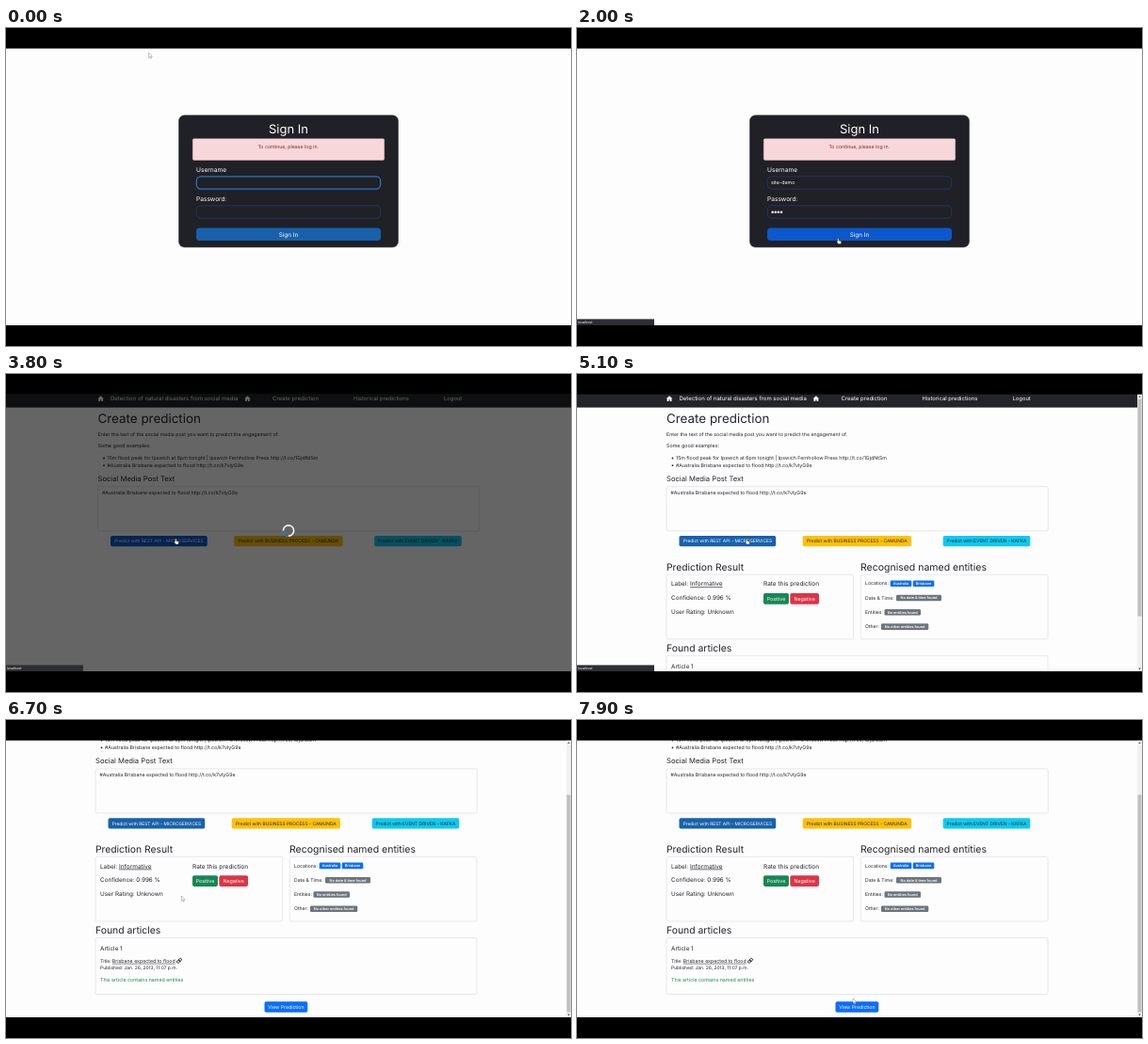
Animation of 600 by 338 pixels, one loop 8 s. Source, as an HTML page:

```html
<!DOCTYPE html>
<html lang="en">
<head>
<meta charset="utf-8">
<title>Create prediction</title>
<style>
  html, body { margin: 0; width: 100%; height: 100%; overflow: hidden; background: #000; }
  svg { display: block; width: 600px; height: 338px; }
  text { font-family: Inter, "Open Sans", sans-serif; text-rendering: geometricPrecision; white-space: pre; }
</style>
</head>
<body>
<script>
const NS = 'http://www.w3.org/2000/svg';
const LOOP = 8000, STEP = 100;
const INK = '#212529', BLUE = '#1761ac', HOVER = '#0b57cc', PRIMARY = '#0d6efd', GREY = '#6c757d';
const SCROLL = 67.8, TOP = 21.5, BOTTOM = 316;

function add(parent, tag, attrs = {}, text) {
  const el = document.createElementNS(NS, tag);
  for (const k in attrs) el.setAttribute(k, attrs[k]);
  if (text) el.textContent = text;
  parent.appendChild(el);
  return el;
}
const group = (p, attrs) => add(p, 'g', attrs);
const path = (p, d, attrs) => add(p, 'path', { d, ...attrs });
const box = (p, x1, y1, x2, y2, fill, rx = 0, more = {}) =>
  add(p, 'rect', { x: x1, y: y1, width: x2 - x1, height: y2 - y1, rx, fill, ...more });
const label = (p, x, y, size, str, fill = INK, more = {}) =>
  add(p, 'text', { x, y, 'font-size': size, fill, ...more }, str);
const middle = (p, x, y, size, str, fill, more) =>
  label(p, x, y, size, str, fill, { 'text-anchor': 'middle', ...more });

function button(p, x1, y1, x2, y2, fill, str, size, color = '#fff') {
  const b = box(p, x1, y1, x2, y2, fill, 1.8);
  middle(p, (x1 + x2) / 2, (y1 + y2) / 2 + size * 0.36, size, str, color);
  return b;
}
function badge(p, x1, x2, y, fill, str) {
  box(p, x1, y - 3.3, x2, y + 3.3, fill, 1.3);
  middle(p, (x1 + x2) / 2, y + 1.4, 3.85, str, '#fff', { 'font-weight': 600 });
}
const show = (el, on) => el.setAttribute('visibility', on ? 'inherit' : 'hidden');

const svg = add(document.body, 'svg', { viewBox: '0 0 600 338' });
box(svg, 0, TOP, 600, BOTTOM, '#fefdfe');

// Sign-in form
const login = group(svg);
box(login, 183.5, 92.8, 416.5, 233, '#202027', 6, { stroke: '#3a3a44', 'stroke-width': 0.6 });
middle(login, 300, 111.7, 13, 'Sign In', '#fff');
box(login, 198.3, 117.7, 401.7, 140.4, '#f8d7da', 1.3, { stroke: '#f5c2c7', 'stroke-width': 0.4 });
middle(login, 299.7, 128, 5.22, 'To continue, please log in.', '#842029');
label(login, 202, 152.7, 6.6, 'Username', '#fff');
label(login, 202, 183.6, 6.6, 'Password:', '#fff');
const fields = [157.8, 188.8].map(y => box(login, 202.3, y, 397.7, y + 13.4, '#202027', 4.6));
const user = label(login, 206, 166.3, 5.3, '', '#fff');
const dots = [0, 1, 2, 3].map(i => add(login, 'circle', { cx: 207.7 + i * 3.1, cy: 195.7, r: 1.25, fill: '#fff' }));
const signIn = box(login, 202, 212.5, 398, 226, BLUE, 3.5);
middle(login, 300, 221.5, 6.35, 'Sign In', '#fff');

// Prediction page
const page = group(svg);
box(page, -10, 21, 620, 35.6, INK);
const HOME = 'M3.3 0 6.6 3H5.7V5.8H3.9V3.9H2.7V5.8H.9V3H0Z';
for (const x of [94.8, 250.6]) path(page, HOME, { fill: '#fff', transform: `translate(${x} 23.3)` });
label(page, 108.5, 28.4, 6, 'Detection of natural disasters from social media', '#fff');
label(page, 280.5, 28.4, 6, 'Create prediction', '#fff');
label(page, 366.5, 28.4, 5.9, 'Historical predictions', '#fff');
label(page, 462.5, 28.4, 5.85, 'Logout', '#fff');

const POST = '#Australia Brisbane expected to flood http://t.co/k7vIyG9e';
label(page, 95, 52.4, 13.4, 'Create prediction');
label(page, 95, 66.1, 5.24, 'Enter the text of the social media post you want to predict the engagement of.');
label(page, 95, 78.4, 5.35, 'Some good examples:');
const samples = ['15m flood peak for Ipswich at 6pm tonight | Ipswich Fernhollow Press http://t.co/1GjdNtSm', POST];
samples.forEach((s, i) => {
  add(page, 'circle', { cx: 101.5, cy: 89.5 + i * 7.7, r: 0.9, fill: INK });
  label(page, 105, 91.2 + i * 7.7, 5.25, s);
});
label(page, 95, 114.3, 7.65, 'Social Media Post Text');
const area = box(page, 95, 119.7, 500.3, 166.8, '#fefdfe', 1.8);
const post = label(page, 99.4, 127.6, 5.24, POST);
const rest = button(page, 108.5, 172, 211.2, 183.3, BLUE, 'Predict with REST API - MICROSERVICES', 4.87);
button(page, 239.7, 172, 355, 183.3, '#ffc107', 'Predict with BUSINESS PROCESS - CAMUNDA', 4.87, INK);
button(page, 388.7, 172, 481.3, 183.3, '#0dcaf0', 'Predict with EVENT DRIVEN - KAFKA', 4.87, INK);

// Results
const result = group(page);
const card = (x1, y1, x2, y2) =>
  box(result, x1, y1, x2, y2, '#fefdfe', 1.5, { stroke: '#d9dadd', 'stroke-width': 0.6 });
label(result, 95, 208.7, 10.3, 'Prediction Result');
label(result, 301, 208.7, 10.5, 'Recognised named entities');
card(95, 213.2, 293.6, 281.8);
card(301.4, 213.2, 500, 281.8);
label(result, 100, 225.4, 6.4, 'Label:');
label(result, 120, 225.4, 6.5, 'Informative', INK, { 'text-decoration': 'underline' });
label(result, 100, 240.2, 6.35, 'Confidence: 0.996 %');
label(result, 100, 254.5, 6.35, 'User Rating: Unknown');
label(result, 198, 225.4, 6.5, 'Rate this prediction');
button(result, 198, 233, 225, 244.7, '#198754', 'Positive', 5.25);
button(result, 226.3, 233, 257, 244.7, '#dc3545', 'Negative', 5.35);
const rows = [
  ['Locations:', [332.7, 355.3, PRIMARY, 'Australia'], [356.8, 379.3, PRIMARY, 'Brisbane']],
  ['Date & Time:', [339, 387, GREY, 'No date & time found']],
  ['Entities:', [326.5, 365, GREY, 'No entities found']],
  ['Other:', [323, 373.3, GREY, 'No other entities found']]
];
rows.forEach(([name, ...tags], i) => {
  const y = 222.6 + i * 15.3;
  label(result, 306, y + 1.8, 5.1, name);
  for (const [x1, x2, fill, str] of tags) badge(result, x1, x2, y + 0.1, fill, str);
});
label(result, 95, 294.8, 10.4, 'Found articles');
card(95, 299.3, 500, 359.3);
label(result, 100, 312.7, 6.35, 'Article 1');
label(result, 100, 325.6, 5, 'Title:');
label(result, 112.8, 325.6, 5.25, 'Brisbane expected to flood', INK, { 'text-decoration': 'underline' });
const link = group(result, { transform: 'translate(184 323.6) rotate(-42)', fill: 'none', stroke: INK, 'stroke-width': 0.9 });
for (const x of [-3, -0.6]) add(link, 'rect', { x, y: -1.3, width: 3.6, height: 2.6, rx: 1.3 });
label(result, 100, 332.7, 4.92, 'Published: Jan. 26, 2013, 11:07 p.m.');
label(result, 100, 345.4, 5.29, 'This article contains named entities', '#198754');
button(result, 274.5, 367, 320.3, 378.5, PRIMARY, 'View Prediction', 5.2);

// Scrollbar
const bar = group(svg);
box(bar, 595, TOP, 600, BOTTOM, '#f1f1f1');
const thumb = box(bar, 595.5, 26.5, 599.5, 257.5, '#c1c1c1');
path(bar, 'M596.3 25 597.5 23.2 598.7 25ZM596.3 312.6 597.5 314.4 598.7 312.6Z', { fill: '#505050' });

// Loading veil
const veil = group(svg);
box(veil, 0, TOP, 600, BOTTOM, '#000', 0, { opacity: 0.6 });
add(veil, 'circle', { cx: 300, cy: 166.5, r: 5.6, fill: 'none', stroke: '#f3f3f3', 'stroke-width': 1.6 });
const arc = path(veil, 'M-3.96-3.96A5.6 5.6 0 0 1 3.96-3.96', { fill: 'none', stroke: BLUE, 'stroke-width': 1.7 });

const status = group(svg);
box(status, 0, 309.4, 82, BOTTOM, '#2d2e33');
label(status, 1, 314.1, 3.6, 'localhost', '#fff');

const cursor = group(svg, { fill: '#fff', 'stroke-linejoin': 'round' });
const arrow = path(cursor, 'M0 0V5.4L1.3 4.2 2.2 6.2 3 5.8 2.2 3.9H3.9Z', { stroke: '#777', 'stroke-width': 0.45 });
const hand = path(cursor,
  'M.9 0c.5 0 .6.3.6.7v1.7l2 .5c.5.1.7.4.6.9l-.4 2.2H.9L-.6 3.6c-.3-.5.2-.9.7-.5l.2.2V.7C.3.3.5 0 .9 0Z',
  { stroke: '#222', 'stroke-width': 0.35 });

// Letterbox
box(svg, 0, 0, 600, TOP, '#000');
box(svg, 0, BOTTOM, 600, 338, '#000');

// time, x, y
const TRACK = [
  [0, 151.5, 26.3], [200, 151.5, 26.3], [700, 262, 164], [1300, 264, 167], [1700, 276.5, 223.5],
  [2300, 276.5, 223.5], [2600, 305, 28], [2800, 305, 28], [3000, 180, 97], [3200, 190, 130],
  [3500, 179.3, 175], [5500, 179.3, 175], [5900, 186.3, 187], [7000, 186.3, 187],
  [7700, 290, 283.5], [7900, 293, 296]
];
const clamp = v => Math.min(1, Math.max(0, v));
const ease = v => v * v * (3 - 2 * v);
const within = (t, a, b) => t >= a && t < b;

function pointer(t) {
  const n = TRACK.findIndex(k => k[0] > t);
  if (n < 0) return TRACK[TRACK.length - 1].slice(1);
  const [a, b] = [TRACK[n - 1], TRACK[n]];
  const f = ease((t - a[0]) / (b[0] - a[0]));
  return [a[1] + (b[1] - a[1]) * f, a[2] + (b[2] - a[2]) * f];
}
function outline(el, on, active, idle) {
  el.setAttribute('stroke', on ? active : idle);
  el.setAttribute('stroke-width', on ? 1.2 : 0.6);
}

function draw(t) {
  const onPage = t >= 2200, done = t >= 4900;
  show(login, !onPage);
  show(page, onPage);
  show(result, done);
  show(bar, done);
  show(veil, within(t, 3700, 4900));
  show(status, within(t, 1800, 2200) || within(t, 3700, 5600));

  user.textContent = 'site-demo'.slice(0, Math.round(clamp((t - 700) / 500) * 9));
  dots.forEach((d, i) => show(d, !onPage && t >= 1300 + i * 100));
  outline(fields[0], t < 1200, '#2b78c4', '#1d4a7c');
  outline(fields[1], within(t, 1200, 1700), '#2b78c4', '#1d4a7c');
  signIn.setAttribute('fill', t >= 1600 ? HOVER : BLUE);

  outline(area, within(t, 3200, 3700), '#86b7fe', '#d5d9de');
  show(post, onPage && t >= 3300);
  rest.setAttribute('fill', within(t, 3500, 4900) ? HOVER : BLUE);
  arc.setAttribute('transform', `translate(300 166.5) rotate(${225 + (t - 3800) * 0.18})`);

  const s = ease(clamp((t - 5700) / 900));
  page.setAttribute('transform', `translate(${done ? 0 : 2.5} ${-s * SCROLL})`);
  thumb.setAttribute('y', 26.5 + s * 53);

  const [x, y] = pointer(t);
  const pointing = within(t, 1600, 2400) || within(t, 2600, 2900) || within(t, 3500, 5600);
  cursor.setAttribute('transform', `translate(${x} ${y})`);
  show(hand, pointing);
  show(arrow, !pointing);
}

const start = performance.now();
function tick() {
  const t = (performance.now() - start) % LOOP;
  draw(Math.floor(t / STEP) * STEP);
  requestAnimationFrame(tick);
}
tick();
</script>
</body>
</html>
```
